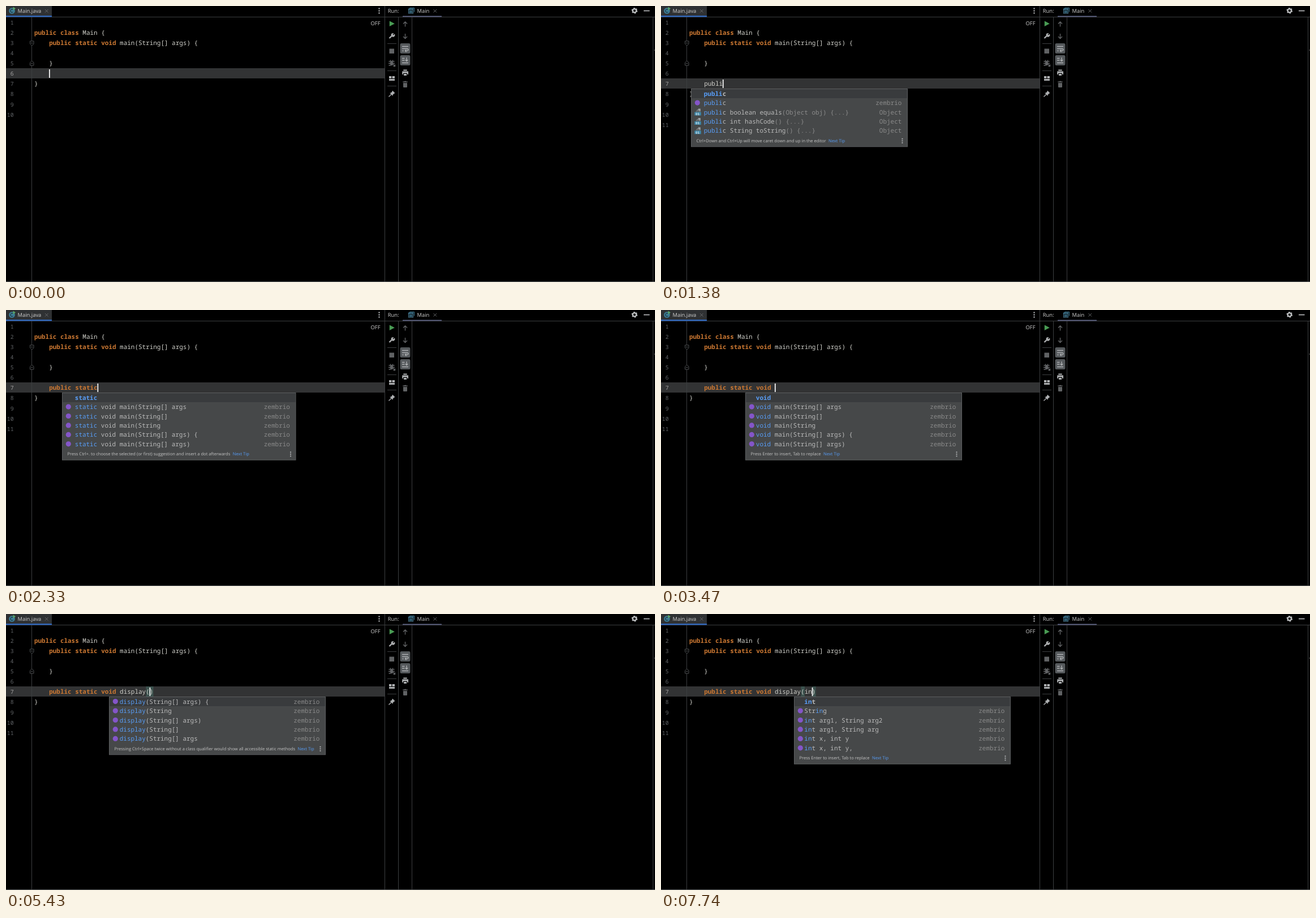
These frames come from a looping animation (1147x488 px, 8000 ms). An HTML page:

```html
<!DOCTYPE html>
<html lang="en">
<head>
<meta charset="utf-8">
<title>Code editor</title>
<style>
  html, body { margin: 0; width: 100%; height: 100%; overflow: hidden; background: #000; }
  svg { display: block; width: 1147px; height: 488px; }
  text { white-space: pre; text-rendering: geometricPrecision; }
  .code, .num { font-family: "Noto Sans Mono", "DejaVu Sans Mono", monospace; }
  .code { font-size: 10.96px; fill: #d0d0ca; }
  .num { font-size: 9.8px; fill: #606366; text-anchor: end; }
  .num.now { fill: #a4a3a3; }
  .ui { font: 9.4px "Open Sans", "Noto Sans", sans-serif; fill: #d0d0d0; }
  .tip { font: 7.56px "Open Sans", "Noto Sans", sans-serif; fill: #c4c4c4; }
  .kw { fill: #cc7832; font-weight: bold; }
  .bold { font-weight: bold; }
  .item { fill: #bbb; }
  .hit { fill: #589df6; }
  .dim { fill: #8a8a8a; }
  .end { text-anchor: end; }
  .rule { stroke: #3c3e40; fill: none; }
  .ico { fill: #afb1b3; }
  .off { fill: #606264; }
  .line { fill: none; stroke: #afb1b3; stroke-width: 1.3; }
  .line.faint { stroke: #646668; }
</style>
</head>
<body>
<svg viewBox="0 0 1147 488" xmlns="http://www.w3.org/2000/svg">
  <rect width="1147" height="488"/>
  <rect id="row" width="669" height="18" fill="#323334"/>

  <!-- editor tab -->
  <rect width="81" height="18" fill="#2f3133"/>
  <path class="rule" d="M0 19.5H1147M45.5 20V487M669.5 0V487M693.5 20V487M717.5 20V487M1143.5 20V487"/>
  <path d="M0 487.5H1147" stroke="#555759"/>
  <rect y="17" width="81" height="2.4" fill="#2f65b8"/>
  <circle cx="10.5" cy="8.5" r="5.3" fill="#3d8099"/>
  <path d="M12.6 6.8A2.7 2.7 0 1 0 12.6 10.4" fill="none" stroke="#1f3440" stroke-width="1.2"/>
  <path d="M12.5 1.5L17 4.5L12.5 7.5Z" fill="#59a869"/>
  <text class="ui" x="20.5" y="12.2">Main.java</text>
  <path class="line faint" style="stroke-width:1" d="M69 6L74.500 11.500M74.500 6L69 11.500M755.500 6L761 11.500M761 6L755.500 11.500"/>
  <g class="ico">
    <circle cx="659.500" cy="4.500" r="1.200"/><circle cx="659.500" cy="8.500" r="1.200"/><circle cx="659.500" cy="12.500" r="1.200"/>
  </g>
  <text class="ui" x="644.500" y="34.300">OFF</text>

  <!-- run panel -->
  <text class="ui" x="674.700" y="12.200">Run:</text>
  <text class="ui" x="726.500" y="12.200">Main</text>
  <rect x="701" y="17.500" width="69" height="1.800" fill="#5b6080"/>
  <path d="M713.500 6V3.500H721.500V10.500" fill="none" stroke="#3d7f99"/>
  <rect x="711.500" y="5" width="8" height="8" fill="#16252c" stroke="#47758c"/>
  <path d="M711 6H720M713 9H718M713 11H718" stroke="#4790b0"/>
  <circle cx="1110.800" cy="8.300" r="3.200" fill="none" stroke="#c0c2c4" stroke-width="2.200"/>
  <circle cx="1110.800" cy="8.300" r="4.500" fill="none" stroke="#c0c2c4" stroke-width="1.600" stroke-dasharray="2.300 2.412"/>
  <path d="M1127 8.500H1137.500" stroke="#c8cacc" stroke-width="1.500"/>
  <path d="M1145.500 78H1147" stroke="#8a8a8a"/>

  <path d="M677.800 26.500L686.800 31.200L677.800 36Z" fill="#499c54"/>
  <path d="M677.500 57L683 51.500" stroke="#afb1b3" stroke-width="2.400"/>
  <path d="M685.800 48.300L683.500 50.600L684.300 51.600L686.800 49.500A3.300 3.300 0 1 1 682.600 48.300Z" class="ico"/>
  <path class="rule" d="M674 66.500H690M674 114.500H690M674 141.500H690"/>
  <rect class="off" x="677.500" y="75.500" width="8.500" height="8.500"/>
  <ellipse class="off" cx="681.500" cy="101.500" rx="2.700" ry="3.700"/>
  <path class="line faint" d="M676.500 98H686.500M676 101.500H687M676.500 105H680M679 95.500L680.500 98M684 95.500L682.500 98M684 103L687.500 106.500M687.500 103.500V106.500H684.500"/>
  <path class="ico" d="M677 124H681.300V128H677ZM682.500 124H687V128H682.500ZM677 129H687V132H677Z"/>
  <path class="ico" d="M683 149.500L687.500 154L686 154.700L683.800 156.800L683.500 159L678.300 153.800L680.500 153.500L682.500 151.300Z"/>
  <path class="line" d="M680.800 156.200L676.500 160.500"/>

  <path class="line faint" d="M705.500 36.500V28M702 31.500L705.500 28L709 31.500M705.500 49V57.500M702 54L705.500 57.500L709 54"/>
  <rect x="696.500" y="66" width="18" height="18" rx="2.500" fill="#55595c"/>
  <rect x="696.500" y="87" width="18" height="18" rx="2.500" fill="#55595c"/>
  <path class="line" d="M700 71.500H711M700 75.500H708.500Q711 75.500 711 77.300T708.500 79.300H705.500M707.500 77.200L705.300 79.300L707.500 81.400M700 79.300H703"/>
  <path class="line" d="M700 92.500H704.500M700 96H704.500M700 100.500H711M708 91V97.500M705.800 95.300L708 97.500L710.200 95.300"/>
  <path class="ico" d="M702.300 112.500H708.700V114.500H702.300ZM700.200 115.500H711V121H709V118.800H702V121H700.200ZM703 120H708V123H703Z"/>
  <path class="off" d="M702 136H709V143Q709 144 708 144H703Q702 144 702 143ZM701.300 133.500H704V132.700H707V133.500H709.700V135H701.300Z"/>

  <g id="nums"></g>
  <g fill="#000" stroke="#4c4f51">
    <path d="M42.500 62H49V67L45.750 70L42.500 67Z"/><path d="M44 65.500H47.500"/>
    <path d="M42.500 105H49V100L45.750 97L42.500 100Z"/><path d="M44 101.500H47.500"/>
  </g>
  <g id="code"></g>
  <rect id="caret" width="1.700" height="15" fill="#fff"/>
  <clipPath id="clip"><rect id="clipBox"/></clipPath>
  <g id="popup"></g>
</svg>
<script>
const LOOP = 8000, CH = 6.576, LEFT = 76.4, ROW = 16.45, TOP = 146.5, MAX = 188.5;
const VENDOR = 'zembrio';
const el = id => document.getElementById(id);

const typed = 'public static void display(in';
const keys = [
  830, 1030, 1130, 1240, 1340, 1440, 1540,
  1680, 1820, 1930, 2050, 2180, 2290, 2360,
  2500, 2600, 2690, 2790, 3470,
  3750, 3850, 3940, 4020, 4090, 4160, 4340, 5430,
  7400, 7620
];
const caretOff = [[90, 490], [4960, 5430], [6430, 6930]];
const ENTER = 490, LAG = 40;

const tips = {
  move: 'Ctrl+Down and Ctrl+Up will move caret down and up in the editor',
  enter: 'Press Enter to insert, Tab to replace',
  dot: 'Press Ctrl+. to choose the selected (or first) suggestion and insert a dot afterwards',
  twice: 'Pressing Ctrl+Space twice without a class qualifier would show all accessible static methods'
};

// Row kinds: k keyword, a assistant, b library method, m method, s template
const main = ['String[] args', 'String[]', 'String', 'String[] args) {', 'String[] args)'];
const mainRows = head => main.map(s => 'a ' + head + 'main(' + s);
const toString = 'public String toString() {...}';
const staticRows = mainRows('static void ');
const sessions = [
  { from: 970, to: 1540, col: 0, pad: 23, total: 18, tip: () => 'move', rows: [
    'k public', 'a public', 'a private', 'k private', 'a package', 'a protected', 'a super', 'k protected',
    'b protected Object clone() {...}', 'b public boolean equals(Object obj) {...}',
    'b public int hashCode() {...}', 'b ' + toString] },
  { from: 1760, to: 2360, col: 7, pad: 23, total: 14, tip: w => w.length > 2 ? 'dot' : 'enter', rows: [
    'k static', 'k sealed', 'k short', staticRows[0], 's sbc', ...staticRows.slice(1),
    'k strictfp', 'k synchronized', 'm ' + toString] },
  { from: 2560, to: 3510, col: 14, pad: 19.3, tip: () => 'enter', rows: [
    'k void', ...mainRows('void '), 'k volatile'] },
  { from: 3810, to: 5460, col: 19, pad: 19.3, tip: w => w == 'display' ? 'twice' : 'enter', rows:
    ['String[] args) {', 'String', 'String[] args)', 'String[]', 'String[] args'].map(s => 'a display(' + s) },
  { from: 7460, to: LOOP, col: 27, pad: 19.3, tip: () => 'enter', rows: [
    'k int', 'a String', 'a int arg1, String arg2', 'a int arg1, String arg', 'a int x, int y', 'a int x, int y,'] }
];

const text = (cls, x, y, body) => `<text class="${cls}" x="${x}" y="${y}">${body}</text>`;
const rect = (x, y, w, h, fill) => `<rect x="${x}" y="${y}" width="${w}" height="${h}" fill="${fill}"/>`;
const span = (cls, s) => s ? `<tspan class="${cls}">${s}</tspan>` : '';
const paint = s => s.replace(/\b(public|class|static|void)\b/g, m => span('kw', m));
const baseline = n => 32.8 + 18.05 * (n - 1);
const codeLine = (n, col, s) => text('code', 49.9 + col * CH, baseline(n), paint(s));
const count = t => keys.filter(k => k <= t).length;

function icon(kind, x, y) {
  if (kind == 'a') return `<circle cx="${x}" cy="${y}" r="4.6" fill="#8455c9"/>`;
  if (kind == 'm') return `<circle cx="${x}" cy="${y}" r="5.5" fill="#c75f68"/>`;
  if (kind == 's') return `<path class="line" transform="translate(${x} ${y})" d="M-5 4H5M-4 1.500H4M0 1V-3M-2.500 -3.500H2.500"/>`;
  if (kind == 'b') return `<g transform="translate(${x} ${y})"><path d="M-3 -1L2 -6H5.500V-1Z" fill="#9aa0a4"/>` +
    '<path d="M-2 -2H4M1 -5V-1" stroke="#55585a"/><rect x="-5" width="11.500" height="6" fill="#3e88aa"/>' +
    '<text x="-3" y="5.300" font-size="6" font-family="sans-serif" font-weight="bold" fill="#dce8ee">01</text></g>';
  return '';
}

function label(kind, s, word) {
  const at = s.toLowerCase().indexOf(word), end = at + word.length;
  const cut = kind == 'b' || kind == 'm' ? s.indexOf('(') : s.length;
  return s.slice(0, at) + span('hit', s.slice(at, end)) + s.slice(end, cut) + span('dim', s.slice(cut));
}

const origin = { a: VENDOR, b: 'Object', m: 'Object', s: 'block comment for structuring code', k: '' };

function popup(p, word) {
  const rows = p.rows.filter(r => r.slice(2).toLowerCase().includes(word));
  const tip = p.tip(word), width = tip == 'dot' ? 412.5 : 382;
  const wordX = LEFT + p.col * CH, x = Math.round(wordX - p.pad) + .5, right = x + width;
  const view = Math.min(rows.length * ROW, MAX), bottom = TOP + view + 20;
  const box = el('clipBox');
  box.setAttribute('x', x);
  box.setAttribute('y', TOP);
  box.setAttribute('width', width);
  box.setAttribute('height', view);

  let out = `<rect x="${x}" y="${TOP}" width="${width}" height="${view + 20}" fill="#464849" stroke="#5c5e60"/>`;
  out += rect(x + .5, TOP + .5, width - 1, ROW - .5, '#393b3d') + '<g clip-path="url(#clip)">';
  rows.forEach((r, i) => {
    const kind = r[0], y = TOP + 8.4 + i * ROW;
    out += icon(kind, x + 10.8, y - .3);
    out += text('code item' + (kind == 'k' ? ' bold' : ''), wordX - .6, y + 3.7, label(kind, r.slice(2), word));
    out += text('code dim end', right - 10.2, y + 3.7, origin[kind]);
  });
  out += '</g>';
  if (rows.length * ROW > MAX) out += rect(right - 8, TOP + .5, 7, MAX * MAX / (p.total * ROW), '#616365');
  out += text('tip', x + 9, bottom - 8, tips[tip] + '<tspan class="hit" dx="4.5">Next Tip</tspan>');
  for (const d of [-3.5, 0, 3.5]) out += `<circle class="ico" cx="${right - 9}" cy="${bottom - 10.3 + d}" r="1.1"/>`;
  return out;
}

function drawCode(n, entered) {
  const now = entered ? 7 : 6, last = entered ? 11 : 10;
  el('row').setAttribute('y', entered ? 128 : 110);
  let nums = '';
  for (let i = 1; i <= last; i++) nums += text(i == now ? 'num now' : 'num', 13.6, baseline(i) + .3, i);
  el('nums').innerHTML = nums;

  const open = typed.indexOf('('), paired = n > open;
  let out = '';
  if (paired) for (const c of [open, n]) out += rect(LEFT + c * CH, 128, CH, 18, '#3b514d');
  out += codeLine(2, 0, 'public class Main {') + codeLine(3, 4, 'public static void main(String[] args) {');
  out += codeLine(5, 4, '}') + codeLine(now + 1, 0, '}');
  out += codeLine(7, 4, typed.slice(0, n) + (paired ? ')' : ''));
  el('code').innerHTML = out;
}

let shown = '';
function frame() {
  const t = performance.now() % LOOP;
  const n = count(t), entered = t >= ENTER;
  const p = sessions.find(s => t >= s.from && t < s.to);
  const word = p ? typed.slice(p.col, count(t - LAG)) : '';
  const blink = caretOff.some(([a, b]) => t >= a && t < b);
  const state = [n, entered, word, blink].join();
  if (state != shown) {
    shown = state;
    drawCode(n, entered);
    el('popup').innerHTML = p ? popup(p, word) : '';
    const caret = el('caret');
    caret.setAttribute('x', LEFT - .4 + n * CH);
    caret.setAttribute('y', entered ? 130 : 112);
    caret.setAttribute('visibility', blink ? 'hidden' : 'visible');
  }
  requestAnimationFrame(frame);
}
frame();
</script>
</body>
</html>
```
